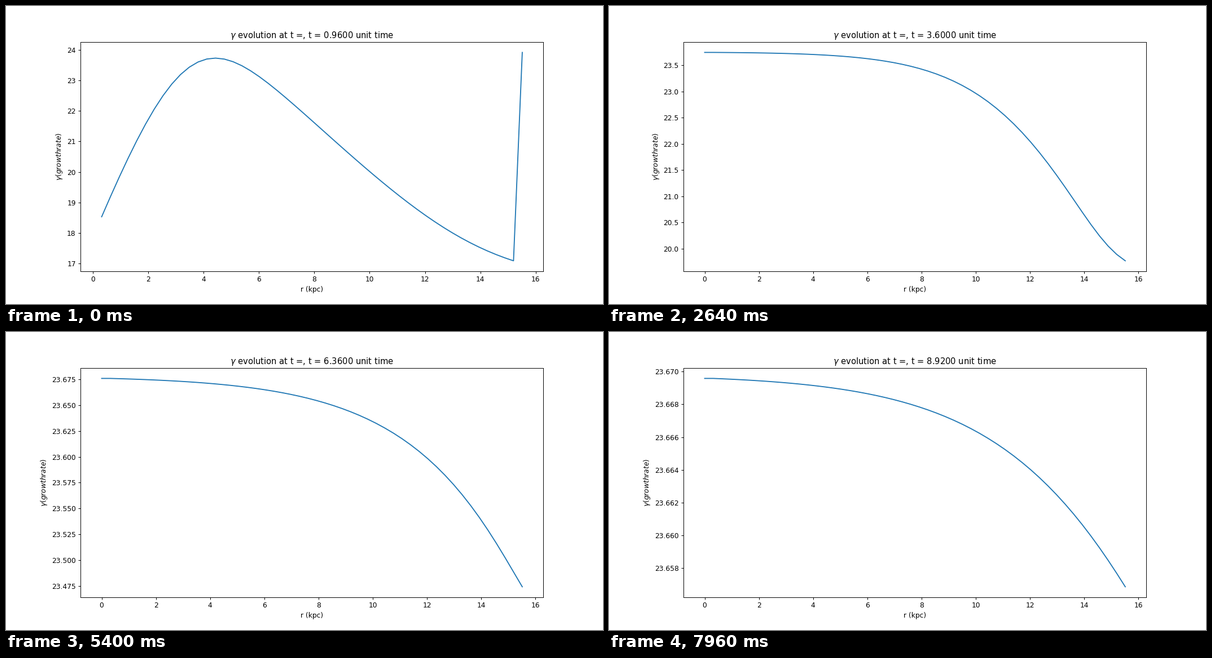
These frames come from a looping animation (1058 by 529 pixels, 8 s). A matplotlib script:

```python
import numpy as np
import matplotlib.pyplot as plt
from matplotlib.animation import FuncAnimation

WIDTH, FRAMES, STEP_MS = 1058, 200, 40
T_START, DT = 0.96, 0.04
R_MAX, POINTS = 15.515, 50
T_EDGE = 1.2          # before this the two boundary points are unsettled
SPIKE = 23.91
GAMMA_INF = 23.669    # growth rate of the dominant mode

# The outer drop of the curve: time, depth, inner radius, softness.
KEYS = np.array([
    (0.96, 7.80, 4.3, 0.80),
    (2.20, 5.72, 6.75, 1.00),
    (3.60, 3.976, 12.0, 2.06),
    (4.52, 2.0075, 17.3, 2.50),
    (5.60, 0.5197, 19.5, 2.98),
    (7.08, 0.0855, 17.4, 3.45),
    (8.92, 0.01273, 15.9, 3.50),
])


def sigmoid(x):
    return 1 / (1 + np.exp(-x))


def smooth(x, y, q):
    """Smooth curve through the points (x, y), taken at q."""
    m = np.gradient(y, x)
    i = np.clip(np.searchsorted(x, q, side="right") - 1, 0, len(x) - 2)
    h = x[i + 1] - x[i]
    s = (q - x[i]) / h
    return ((1 + 2 * s) * (1 - s) ** 2 * y[i] + s * (1 - s) ** 2 * h * m[i]
            + s ** 2 * (3 - 2 * s) * y[i + 1] + s ** 2 * (s - 1) * h * m[i + 1])


def plateau(t):
    """Inner level, settling on the final growth rate."""
    slow = (4.7 - 8.46 * np.exp(-0.42 * t)) * np.exp(-t)
    return GAMMA_INF + slow + 1.5 * np.exp(-4 * (t - T_START))


def core_dip(r, t):
    """Early deficit at the centre that fades quickly."""
    return 2.384 * np.exp(-2.93 * (t - T_START)) * np.logaddexp(0, (3 - r) / 1.05)


def outer_drop(r, t):
    """Fall towards the rim: a soft start, and flatter near the edge."""
    key_t, depth, start, soft = KEYS.T
    depth = np.exp(smooth(key_t, np.log(depth), t))
    start, soft = smooth(key_t, start, t), smooth(key_t, soft, t)
    rim, rim_soft = 13.46 + 0.45 * t, 0.6 + 1.3 * np.exp(-3 * (t - T_START))
    mid = (r[1:] + r[:-1]) / 2
    slope = sigmoid((mid - start) / soft) * sigmoid((rim - mid) / rim_soft)
    fall = np.append(0, np.cumsum(slope))
    return depth * fall / fall[-1]


def growth_rate(r, t):
    gamma = plateau(t) - core_dip(r, t) - outer_drop(r, t)
    gamma[0] = gamma[1]  # symmetric about the centre
    return gamma


radius = np.linspace(0, R_MAX, POINTS)

fig, ax = plt.subplots(figsize=(12, 6), dpi=WIDTH / 12)
fig.subplots_adjust(top=0.8792)
line, = ax.plot([], [])
ax.set_xlabel("r (kpc)")
ax.set_ylabel(r"$\gamma (growthrate)$")
ax.ticklabel_format(useOffset=False)


def update(i):
    t = T_START + DT * i
    r, gamma = radius, growth_rate(radius, t)
    if t < T_EDGE - 1e-9:
        gamma[-1] = SPIKE
        r, gamma = r[1:], gamma[1:]
    line.set_data(r, gamma)
    ax.relim()
    ax.autoscale_view()
    ax.set_title(rf"$\gamma$ evolution at t =, t = {t:.4f} unit time")
    return line,


anim = FuncAnimation(fig, update, frames=FRAMES, interval=STEP_MS,
                     init_func=lambda: update(0), repeat=True, blit=False)
plt.show()
```
